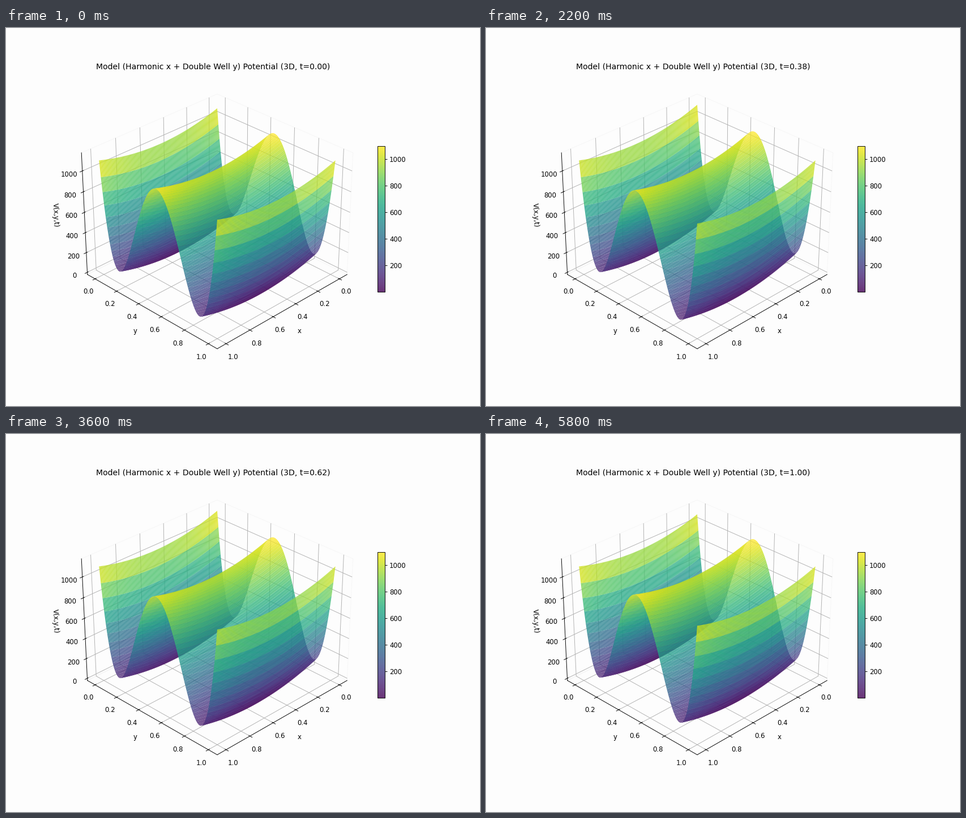
Recreate the animation shown at these times as a matplotlib script. Size 837 by 669 pixels, loop 6 s.

```python
import numpy as np
import matplotlib.pyplot as plt
from matplotlib.animation import FuncAnimation

FRAMES = 30
LOOP_MS = 6000
PAPER = "#fdfdfd"
FIELD = 70

x = np.linspace(0, 1, 100)
X, Y = np.meshgrid(x, x)


def pulse(t):
    """Short oscillating field, strongest halfway through."""
    s = t - 0.5
    return FIELD * np.exp(-18 * s**2) * np.cos(6 * np.pi * s)


def potential(t):
    harmonic = 400 * (X - 0.5) ** 2
    double_well = 1000 * (1 - 8 * (Y - 0.5) ** 2) ** 2
    return harmonic + double_well + pulse(t) * (X + Y - 1)


def draw_surface(t):
    return ax.plot_surface(X, Y, potential(t), rstride=1, cstride=1,
                           cmap="viridis", alpha=0.8, edgecolor="none")


fig = plt.figure(figsize=(10.009, 8), dpi=83.625, facecolor=PAPER)
ax = fig.add_subplot(projection="3d", facecolor=PAPER)
ax.view_init(elev=30, azim=45)

for axis in (ax.xaxis, ax.yaxis, ax.zaxis):
    axis.set_pane_color((0.95, 0.95, 0.95, 0.5))
    axis.pane.set_fill(False)

half = 0.55 * 25 / 24
ax.set_xlim(0.5 - half, 0.5 + half)
ax.set_ylim(0.5 - half, 0.5 + half)
ax.set_zlim(-22, 1172)
ax.set_xlabel("x")
ax.set_ylabel("y")
ax.set_zlabel("V(x,y,t)")

surface = draw_surface(0)
fig.colorbar(surface, ax=ax, shrink=0.5)


def update(i):
    global surface
    t = i / (FRAMES - 1)
    surface.remove()
    surface = draw_surface(t)
    ax.set_title(f"Model (Harmonic x + Double Well y) Potential (3D, t={t:.2f})")


anim = FuncAnimation(fig, update, frames=FRAMES, init_func=lambda: None,
                     interval=LOOP_MS / FRAMES, repeat=True, repeat_delay=0)
plt.show()
```
